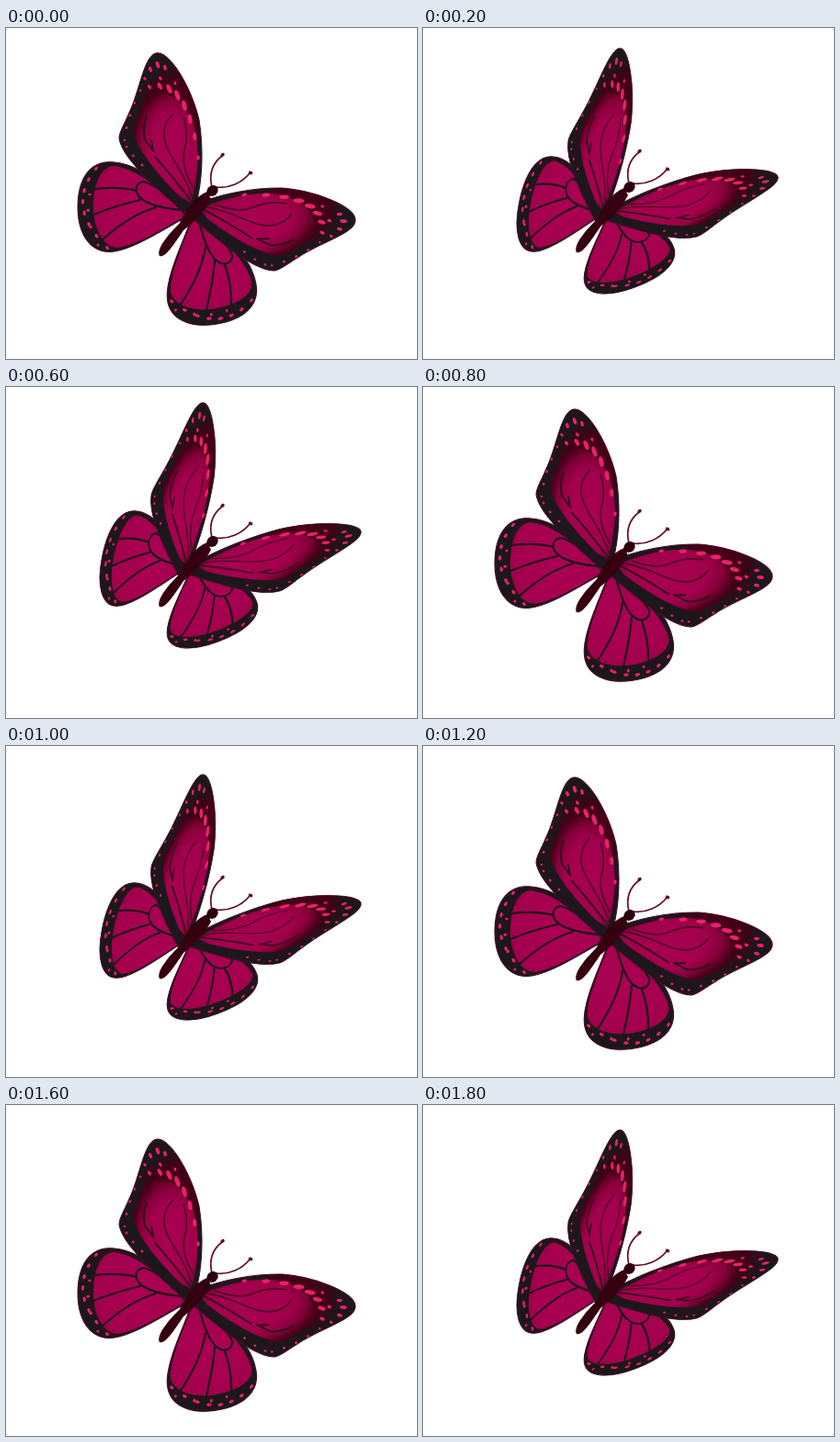
Recreate the animation shown at these times as an HTML page with a canvas. Size 447 by 360 pixels, loop 2000 ms.

```html
<!DOCTYPE html>
<html>
<head>
<meta charset="utf-8">
<style>
html, body { margin: 0; width: 100%; height: 100%; overflow: hidden; background: #fff; }
canvas { display: block; }
</style>
</head>
<body>
<canvas id="stage" width="447" height="360"></canvas>
<script>
const ctx = document.getElementById('stage').getContext('2d');
const BLACK = '#1d171b', MAROON = '#35000f', EDGE = '#4f0b29', PINK = '#ea2069';
const STEP = 200;
const LIFT = [0, -4, -7, -9, -3, 5, 7, 11, 10, 1];

// Both wings are drawn once, in the open left pose. Three anchor points
// (tip, corner, root) carry them to the other side and to the folded pose.
const FORE_ANCHORS = [165, 27, 123, 120, 193, 192];
const HIND_ANCHORS = [112, 145, 88, 232, 194, 206];
const OPEN = {
  hind: [HIND_ANCHORS, [273, 281, 190, 318, 202, 209]],
  fore: [FORE_ANCHORS, [380, 208, 292, 264, 210, 205]]
};
const FOLDED = {
  hind: [[140, 143, 104, 234, 188, 211], [274, 245, 191, 293, 200, 211]],
  fore: [[214, 26, 158, 126, 189, 204], [386, 166, 298, 231, 208, 210]]
};

const foreOutline = new Path2D('M206 194C214 168 215 130 210 100C203 68 180 27 165 27' +
  'C150 27 146 68 133 94C129 104 123 113 123 120C126 140 156 168 194 201Z');
const foreField = new Path2D('M201 190C207 170 212 140 206 112C198 78 166 58 152 78' +
  'C143 92 139 105 138 113C144 135 170 165 190 184Z');
const hindOutline = new Path2D('M196 204C180 178 150 149 118 146C94 143 78 160 78 195' +
  'C78 225 92 244 113 243.5C135 243 170 220 192 208Z');
const hindField = new Path2D('M194 203C178 186 150 155 118 150C102 150 95 172 95 195' +
  'C95 218 106 238 120 239C140 237 168 220 191 207Z');
const body = new Path2D('M219 178C207 182 195 198 189 212C178 223 163 240 167 248' +
  'C173 251 185 232 193 220C204 212 217 198 223 186Z');

function line(path, width, style) {
  ctx.lineWidth = width;
  ctx.strokeStyle = style;
  ctx.stroke(typeof path === 'string' ? new Path2D(path) : path);
}

function fill(path, style) {
  ctx.fillStyle = style;
  ctx.fill(path);
}

function dot(x, y, rx, ry, angle) {
  ctx.beginPath();
  ctx.ellipse(x, y, rx, ry, angle, 0, Math.PI * 2);
  ctx.fill();
}

// Spots spread evenly along a quadratic curve, largest in the middle.
function spotRow([x0, y0], [cx, cy], [x1, y1], count, size, swell, angle, turn) {
  ctx.fillStyle = PINK;
  for (let i = 0; i < count; i++) {
    const t = i / (count - 1), s = 1 - t;
    const x = s * s * x0 + 2 * s * t * cx + t * t * x1;
    const y = s * s * y0 + 2 * s * t * cy + t * t * y1;
    const r = size + swell * Math.sin(Math.PI * t);
    dot(x, y, r, 0.9 + r * 0.28, angle + turn * t);
  }
}

function radial(x, y, r, ...stops) {
  const g = ctx.createRadialGradient(x, y, 0, x, y, r);
  stops.forEach(([at, color]) => g.addColorStop(at, color));
  return g;
}

// Affine map that takes triangle s to triangle d.
function placeTriangle(s, d) {
  const [x1, y1, x2, y2] = [s[2] - s[0], s[3] - s[1], s[4] - s[0], s[5] - s[1]];
  const det = x1 * y2 - x2 * y1;
  const row = k => {
    const u = d[2 + k] - d[k], v = d[4 + k] - d[k];
    const mx = (u * y2 - v * y1) / det, my = (v * x1 - u * x2) / det;
    return [mx, my, d[k] - mx * s[0] - my * s[1]];
  };
  const [a, c, e] = row(0), [b, f, h] = row(1);
  ctx.transform(a, b, c, f, e, h);
}

function drawHind() {
  fill(hindOutline, BLACK);
  fill(hindField, radial(146, 194, 65, [0, '#ac0054'], [.7, '#a4004e'], [1, '#960042']));
  line('M190 198Q161 195 149 187C139 180 139 170 149 167Q168 172 192 197', 2.2, BLACK);
  line('M142 177Q122 172 97 175M146 187Q120 193 95 203M163 195Q135 203 104 231', 2.2, BLACK);
  spotRow([98, 153], [64, 194], [110, 239], 8, 2.4, .4, -.8, -1.6);
  spotRow([91, 181], [85, 206], [100, 236], 4, 1.6, .3, 0, -.8);
  line(hindOutline, 1, EDGE);
}

function drawFore() {
  fill(foreOutline, BLACK);
  ctx.save();
  ctx.clip(foreOutline);
  fill(foreOutline, radial(186, 84, 44, [0, '#4b0019'], [.65, '#400015'], [1, '#40001500']));
  ctx.restore();

  // The field darkens outwards along an upright ellipse.
  ctx.save();
  ctx.clip(foreField);
  ctx.translate(180, 140);
  ctx.scale(.58, 1);
  ctx.fillStyle = radial(0, 0, 74, [0, '#a80051'], [.6, '#a2004c'], [.82, '#850039'], [1, '#4a0019']);
  ctx.fillRect(-130, -130, 260, 260);
  ctx.restore();

  line('M201 188Q180 160 162 140M153 96Q148 109 151 121L160 134L158 122', 2, '#34101f');
  line('M202 184C196 158 174 138 172 119Q171 103 181 94M203 173Q190 150 194 134Q199 116 193 98', 1.7, '#4b0826');
  spotRow([156, 64], [198, 54], [209, 141], 8, 2.8, 3.2, 1, .6);
  spotRow([157, 45], [165, 36], [173, 43], 3, 3, .8, 1.2, .2);
  spotRow([151, 55], [168, 52], [184, 60], 3, 2, .4, .8, .4);
  spotRow([146, 68], [132, 95], [129, 122], 5, 1.2, .4, 1.8, 0);
  spotRow([131, 129], [137, 139], [148, 149], 3, 1.4, 0, .7, 0);
  line(foreOutline, 1, EDGE);
}

function drawBody() {
  const tint = '#650b31';
  line('M224 173C220 157 226 146 235 139M228 173C243 175 257 168 265 158', 1.7, tint);
  ctx.fillStyle = tint;
  dot(235.5, 138, 2.4, 1.8, -.6);
  dot(266, 157.5, 2.4, 1.8, .3);
  fill(body, MAROON);
  ctx.fillStyle = '#2c000e';
  dot(224.5, 177, 6.5, 5.7, -.7);
}

function draw(now) {
  const step = Math.floor(now / STEP) % LIFT.length;
  const pose = step % 2 ? FOLDED : OPEN;
  ctx.setTransform(1, 0, 0, 1, 0, 0);
  ctx.fillStyle = '#fff';
  ctx.fillRect(0, 0, 447, 360);
  ctx.lineCap = ctx.lineJoin = 'round';
  ctx.translate(0, LIFT[step]);
  for (const [targets, anchors, paint] of [
    [pose.hind, HIND_ANCHORS, drawHind],
    [pose.fore, FORE_ANCHORS, drawFore]
  ]) {
    for (const target of targets) {
      ctx.save();
      placeTriangle(anchors, target);
      paint();
      ctx.restore();
    }
  }
  drawBody();
}

const start = performance.now();
function tick() {
  draw(performance.now() - start);
  requestAnimationFrame(tick);
}
tick();
</script>
</body>
</html>
```
